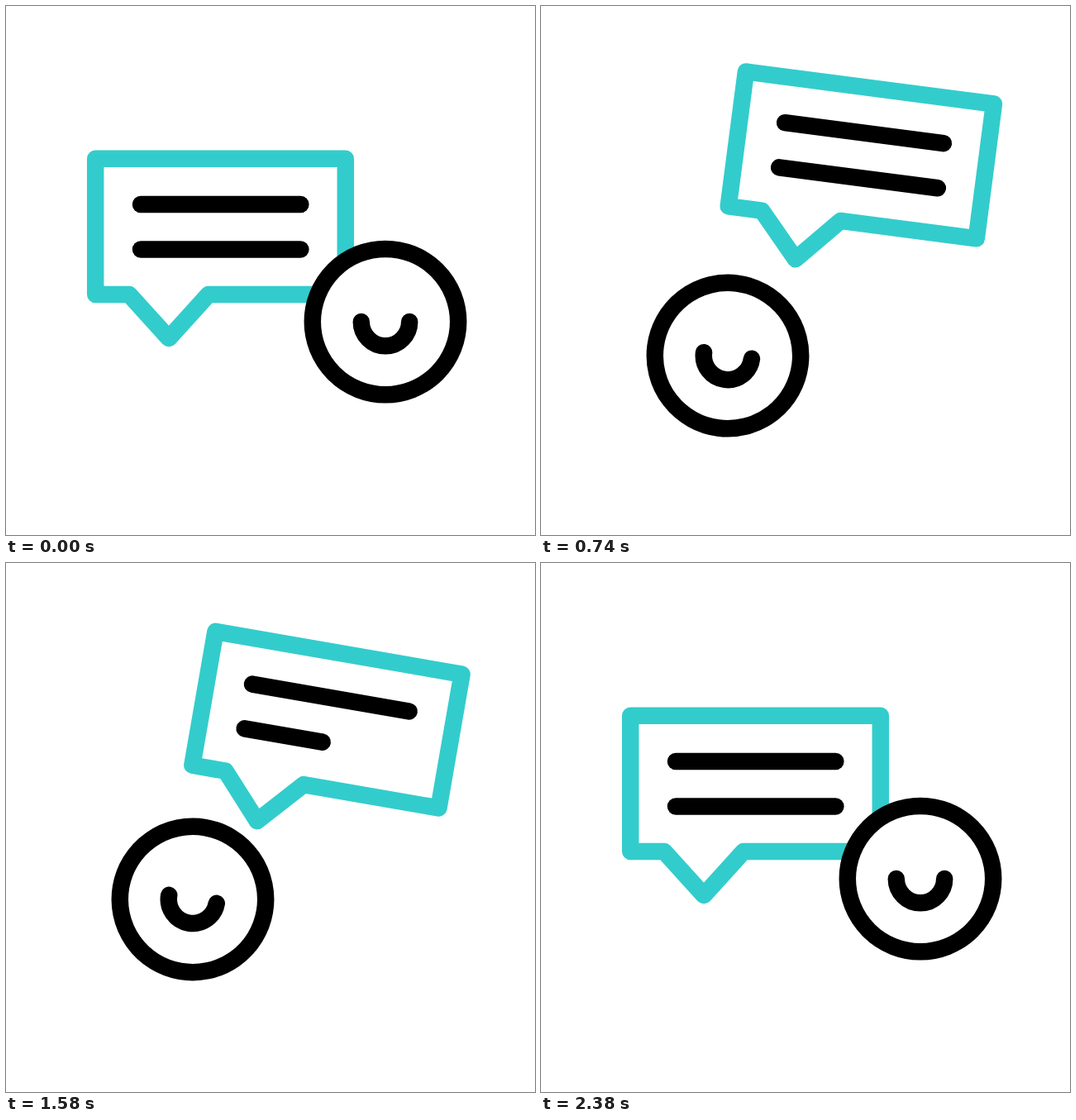
Recreate the animation shown at these times as an HTML page. Size 640x640 px, loop 2.4 s.

```html
<!DOCTYPE html>
<html lang="en">
<head>
<meta charset="utf-8">
<title>Speech bubble</title>
<style>
  html, body { margin: 0; width: 100%; height: 100%; overflow: hidden; background: #fff; }
  svg { display: block; width: 100%; height: 100%; }
</style>
</head>
<body>
<svg viewBox="0 0 640 640" fill="none" stroke="#000" stroke-width="20.5" stroke-linecap="round" stroke-linejoin="round">
  <g id="bubble">
    <path stroke="#33cccc" d="M108.2 184.8H410.8V349H245L197 402L149 349H108.2Z"/>
    <path id="line1"/>
    <path id="line2"/>
  </g>
  <g id="face">
    <circle cx="459" cy="382.1" r="88.2" fill="#fff"/>
    <path d="M429.8 382a29.2 29.2 0 0 0 58.4 0"/>
  </g>
</svg>
<script>
  const LOOP = 2400, STEP = 20, LINE = 193.4;
  const el = id => document.getElementById(id);
  const bubble = el('bubble'), face = el('face');
  const line1 = el('line1'), line2 = el('line2');

  // Eased 0 to 1 between two times.
  function ramp(t, from, to) {
    const p = Math.min(1, Math.max(0, (t - from) / (to - from)));
    return p * p * (3 - 2 * p);
  }
  // Up to 1, held, and back to 0.
  const hold = (t, a, b, c, d) => ramp(t, a, b) - ramp(t, c, d);
  // Up to 1 at the peak and straight back.
  const pulse = (t, a, peak, b) => hold(t, a, peak, peak, b);

  function draw(t) {
    const away = hold(t, 200, 620, 1700, 2000);
    const near = hold(t, 620, 920, 1700, 2000);
    const apart = pulse(t, 920, 1280, 1700);
    const angle = 10 * (hold(t, 620, 800, 1600, 1800) - 2 * pulse(t, 800, 1200, 1600));
    const pop = 1 + 0.5 * pulse(t, 2000, 2190, 2380);

    const bubbleY = -95.8 * away + 25.8 * near - 38.5 * apart;
    const faceY = 52.5 * away - 32.8 * near + 26 * apart;
    bubble.setAttribute('transform',
      `translate(${124.4 * away} ${bubbleY}) rotate(${angle} 259.5 293.5)`);
    face.setAttribute('transform',
      `translate(${-233 * away} ${faceY}) rotate(${angle} 459 382) ` +
      `translate(459 368.5) scale(${pop}) translate(-459 -368.5)`);
    line1.setAttribute('d', `M163 239.9h${LINE - 122 * pulse(t, 800, 1200, 1600)}`);
    line2.setAttribute('d', `M163 294.5h${LINE - 98.6 * pulse(t, 1200, 1600, 2000)}`);
  }

  const start = performance.now();
  function frame() {
    const t = (performance.now() - start) % LOOP;
    draw(Math.floor(t / STEP) * STEP);
    requestAnimationFrame(frame);
  }
  draw(0);
  requestAnimationFrame(frame);
</script>
</body>
</html>
```
